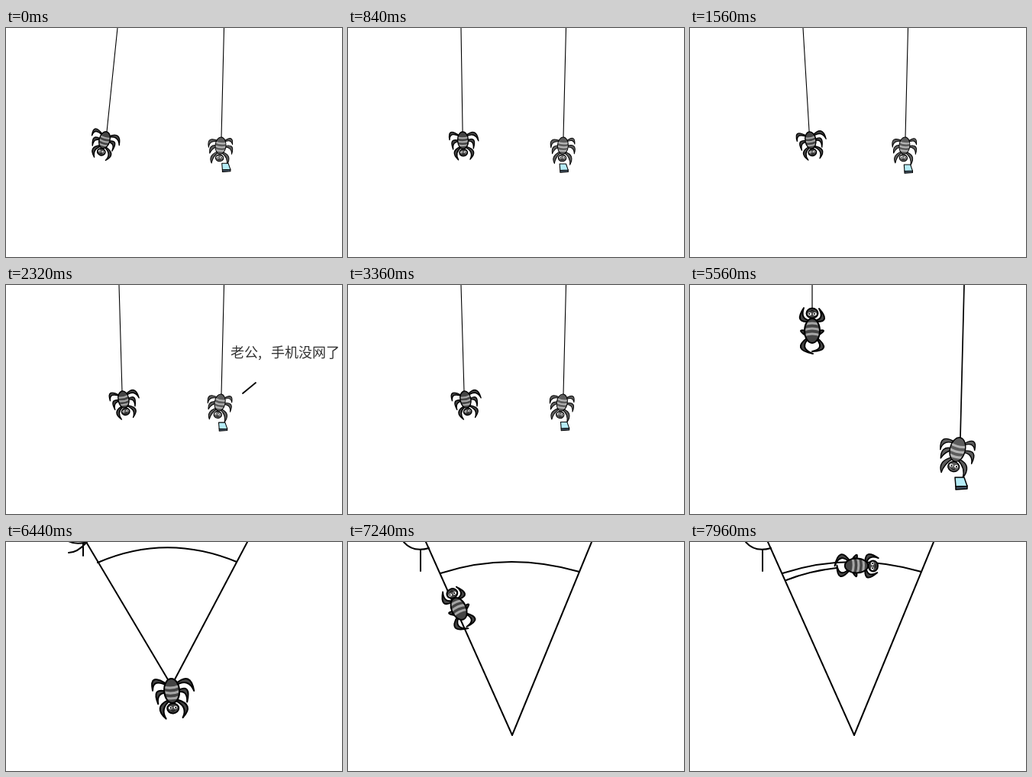
These frames come from a looping animation (440 by 300 pixels, 8 s). An HTML page with a canvas:

```html
<!DOCTYPE html>
<html lang="zh">
<head>
<meta charset="utf-8">
<style>
html, body { margin: 0; width: 100%; height: 100%; overflow: hidden; background: #fff; }
canvas { display: block; }
</style>
</head>
<body>
<canvas id="stage" width="440" height="300"></canvas>
<script>
const g = document.getElementById('stage').getContext('2d');
const LOOP = 8000, ZOOM = 3360, CLIMB = 4760, WEB = 5640;

const mix = (a, b, k) => a + (b - a) * k;
const ease = k => k * k * (3 - 2 * k);
const span = (t, a, b) => Math.min(1, Math.max(0, (t - a) / (b - a)));

// Value at time t on a list of [time, value] keys
function key(t, ...keys) {
  let [t0, v0] = keys[0];
  for (const [t1, v1] of keys) {
    if (t < t1) return mix(v0, v1, ease(span(t, t0, t1)));
    [t0, v0] = [t1, v1];
  }
  return v0;
}

// Legs: base, middle and tip, with the head pointing down
const ROOTS = [[-6, -9], [-8, 0], [-6, 12], [6, -9], [8, 0], [6, 12]];
const HANG = [
  [-22, -16, -25, -2], [-20, 1, -19, 16], [-17, 22, -10, 36],
  [22, -14, 29, 2], [20, 0, 19, 16], [19, 22, 12, 36]];
const HOLD = [
  [-21, -9, -22, 5], [-18, 4, -19, 16], [-16, 22, -14, 34],
  [18, -15, 22, -4], [21, 0, 22, 14], [17, 20, 15, 35]];
const CRAWL = [
  [-15, -22, 0, -27], [-15, 0, -8, -6], [-16, 16, -9, 29],
  [15, -22, -1, -30], [15, 0, 9, -6], [16, 16, 11, 30]];
const DARK = { fill: '#444', band: '#a6a6a6', line: 2 };
const PALE = { fill: '#5c5c5c', band: '#b4b4b4', line: 1.4 };

function line(width, ...pts) {
  g.lineWidth = width;
  g.beginPath();
  pts.forEach(([x, y]) => g.lineTo(x, y));
  g.stroke();
}

function curve(x0, y0, cx, cy, x1, y1) {
  g.beginPath();
  g.moveTo(x0, y0);
  g.quadraticCurveTo(cx, cy, x1, y1);
  g.stroke();
}

function oval(x, y, rx, ry, fill) {
  g.beginPath();
  g.ellipse(x, y, rx, ry, 0, 0, 7);
  g.fillStyle = fill;
  g.fill();
}

function leg([bx, by], [mx, my, tx, ty], fill) {
  const hx = (bx + tx) / 2, hy = (by + ty) / 2;
  const d = Math.hypot(mx - hx, my - hy) || 1;
  const ux = (mx - hx) / d, uy = (my - hy) / d;
  g.beginPath();
  g.moveTo(bx, by);
  g.quadraticCurveTo(2 * mx - hx, 2 * my - hy, tx, ty);
  g.quadraticCurveTo(2 * mx - hx - ux * 9, 2 * my - hy - uy * 9, bx - ux * 3, by - uy * 3);
  g.closePath();
  g.fillStyle = fill;
  g.fill();
  g.stroke();
}

function spider(x, y, size, turn, pose, look) {
  g.save();
  g.translate(x, y);
  g.scale(size, size);
  g.rotate(turn);
  g.lineWidth = look.line;
  pose.forEach((p, i) => leg(ROOTS[i], p, look.fill));
  oval(0, 0, 10, 16, look.fill);
  g.save();
  g.clip();
  g.strokeStyle = look.band;
  g.lineWidth = 3.2;
  for (const by of [-5, 2, 9]) curve(-11, by - 1, 0, by + 3, 11, by - 1);
  g.restore();
  g.lineWidth = look.line;
  g.beginPath();
  g.ellipse(0, 0, 10, 16, 0, 0, 7);
  g.stroke();
  oval(0, 23, 7.5, 6.5, look.fill);
  g.stroke();
  for (const ex of [-3.3, 3.3]) {
    oval(ex, 22, 2.5, 2, '#fff');
    oval(ex + 0.4, 22.2, 1.1, 1.1, '#000');
  }
  g.lineWidth = 0.9;
  curve(-2, 26, 0, 27.5, 2, 26);
  g.restore();
}

// Spider hanging by the tail from a thread end
function hang(x, y, size, deg, pose, look) {
  const a = deg * Math.PI / 180;
  spider(x - Math.sin(a) * 16 * size, y + Math.cos(a) * 16 * size, size, a, pose, look);
}

function phone(x, y, s) {
  g.save();
  g.translate(x, y);
  g.scale(s, s);
  const shape = (fill, ...pts) => {
    g.beginPath();
    pts.forEach(([px, py]) => g.lineTo(px, py));
    g.closePath();
    g.fillStyle = fill;
    g.fill();
    g.stroke();
  };
  g.lineWidth = 1.5;
  shape('#456', [-7, 4], [8, 4], [8, 8], [-7, 9]);
  shape('#b5ecf7', [-8, -7], [4, -7], [8, 4.5], [-7, 5]);
  g.restore();
}

function speech() {
  g.fillStyle = '#333';
  g.font = '18px "Noto Sans CJK SC", "Noto Sans CJK", sans-serif';
  g.fillText('老公,', 294, 95);
  g.fillText('手机没网了', 347, 95);
  line(1.8, [310, 142], [327, 128]);
}

function threads(t) {
  const k = ease(span(t, ZOOM, 3840));
  const size = mix(0.7, 1, k), width = mix(1.1, 1.7, k);

  const rx = mix(282, 354, k), ry = mix(143, 200, k);
  const tilt = key(t, [0, 5], [400, 8], [840, 3], [1300, 7], [1700, 5], [2320, 10], [2800, 9], [ZOOM, 9], [3840, 13]);
  const px = key(t, [0, 9], [840, 1], [1300, 6], [2320, 3], [ZOOM, 3], [3840, 1]);
  const py = key(t, [0, 56], [840, 57], [2320, 60], [3840, 59]);
  line(width, [mix(285.5, 359, k), 0], [rx, ry]);
  hang(rx, ry, size, tilt, HOLD, PALE);
  phone(rx + px * size, ry + py * size, size);

  if (t >= CLIMB) {
    const up = ease(span(t, CLIMB, 5560));
    const x = mix(165, 160, up), y = mix(209, 60, up);
    line(1.2, [160, 0], [x, y - 28]);
    spider(x, y, 1, Math.PI + 0.08 * Math.sin(up * Math.PI * 6), CRAWL, DARK);
  } else {
    const sway = t < 1735 ? -14 * Math.cos(t / 1157 * 2 * Math.PI) : key(t, [1735, 14], [2320, 4]);
    const px0 = key(t, [0, 146], [840, 148]);
    const lx = mix(px0 + sway, 165, k);
    const ly = mix(key(t, [0, 136], [1720, 136], [2320, 139]), 195, k);
    const turn = t < 1735 ? -sway * 1.1 : key(t, [1735, -15], [2320, -10], [ZOOM, -10], [3840, -7]);
    const nod = 4 * Math.sin(span(t, 4120, 4520) * 2 * Math.PI);
    line(width, [mix(px0, 161, k), 0], [lx, ly]);
    hang(lx, ly, size, turn + nod, HANG, DARK);
  }
  if (t >= 1880 && t < ZOOM) speech();
}

function web(t) {
  const low = t < 6440 ? mix(60, 181, span(t, WEB, 6440))
    : key(t, [6440, 181], [6840, 240], [7040, 253]);
  const k = (low - 181) / 72;
  const held = t < 6880;
  const gap = held ? 4 : 0;
  const mid = mix(216.5, 215, k);
  line(2, [mix(105, 102, k), 0], [mid - gap, low]);
  line(2, [mix(316, 319, k), 0], [mid + gap, low]);
  curve(mix(120, 121, k), mix(27, 41, k), 210, mix(-12, 12, k), mix(302, 303, k), mix(26, 39, k));

  // Corner of the neighbouring web
  const dy = (k - 1) * 8;
  curve(73, dy, 85, 14 + dy, 106, 8 + dy);
  const vx = mix(101, 95, k);
  line(2, [vx, 10 + dy], [vx, mix(18, 38, k)]);
  if (k < 0.5) curve(82, 14 + dy + 8, 93, 14 + dy + 8, 104, 2 + dy + 8);

  if (held) {
    hang(216, low - 2, 1, -4, HANG, DARK);
  } else if (t < 7300) {
    const up = span(t, 6880, 7300);
    spider(mix(212, 134, up), mix(240, 62, up), 0.95, Math.atan2(78, -178), CRAWL, DARK);
  } else {
    const go = span(t, 7300, 7960);
    const x = mix(134, 218, go), y = mix(54, 31, Math.sin(go * Math.PI / 2));
    const tail = Math.max(126, x - 26);
    g.lineWidth = 2;
    curve(126, 50, (126 + tail) / 2 - 3, y + 7, tail, y + 3);
    spider(x, y, 0.95, mix(-2.1, -1.55, Math.sin(go * Math.PI / 2)), CRAWL, DARK);
  }
}

function frame(now) {
  let t = Math.floor(now % LOOP / 40) * 40;
  if (t > ZOOM && t < WEB) t = Math.floor((t - 40) / 80) * 80 + 40;
  t = now % LOOP >= ZOOM ? Math.max(t, ZOOM) : t;
  g.fillStyle = '#fff';
  g.fillRect(0, 0, 440, 300);
  g.strokeStyle = '#000';
  g.lineCap = g.lineJoin = 'round';
  (t < WEB ? threads : web)(t);
}

const start = performance.now();
function tick() {
  frame(performance.now() - start);
  requestAnimationFrame(tick);
}
tick();
</script>
</body>
</html>
```
